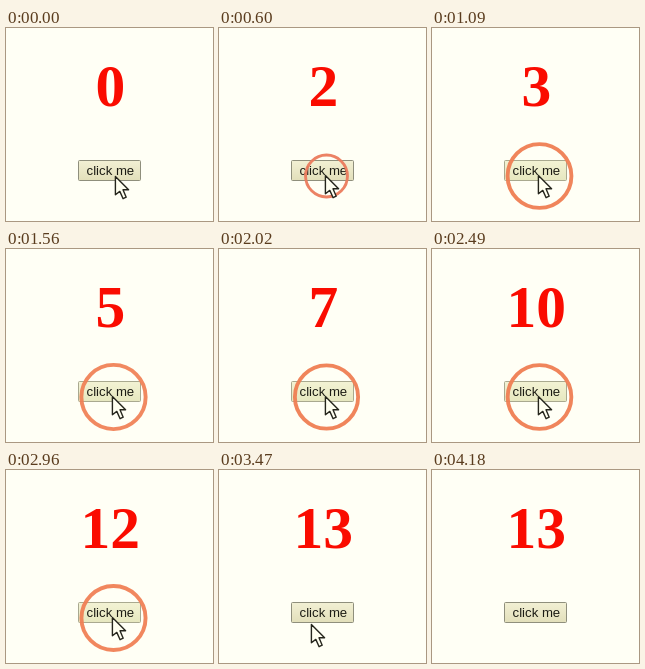
Animation of 207x193 px, one loop 4.66 s. Source, as an HTML page:

```html
<!DOCTYPE html>
<html lang="en">
<head>
<meta charset="utf-8">
<title>Click counter</title>
<style>
  html, body { margin: 0; width: 100%; height: 100%; overflow: hidden; background: #fffff5; }
  svg { display: block; width: 100vw; height: 100vh; }
  #count { font: bold 59.5px "Liberation Serif", serif; fill: #fa0c00; text-anchor: middle; }
  #label { font: 13.2px "Liberation Sans", sans-serif; fill: #1c1c14; text-anchor: middle; }
</style>
</head>
<body>
<svg viewBox="0 0 207 193">
  <defs>
    <linearGradient id="face" x2="0" y2="1">
      <stop offset="0" stop-color="#f2f0d4"/>
      <stop offset="1" stop-color="#e2dfba"/>
    </linearGradient>
    <linearGradient id="lit" x2="0" y2="1">
      <stop offset="0" stop-color="#f3f3d4"/>
      <stop offset="1" stop-color="#e6e7bf"/>
    </linearGradient>
  </defs>
  <rect width="207" height="193" fill="#fffff5"/>
  <text id="count" x="104.3" y="77.7">0</text>
  <rect id="button" x="72.5" y="132.5" width="62" height="20" rx="1"/>
  <text id="label" x="104.4" y="147">click me</text>
  <circle id="ring" cx="107.5" cy="148" fill="none"/>
  <path id="cursor" d="M0 0V18.4L4.4 15L7.7 22.3L10.8 20.8L7.6 13.4H13.2Z"
        fill="#fffff0" stroke="#25251c" stroke-width="1.4" stroke-linejoin="round"/>
</svg>
<script>
const LOOP = 4660;
const RING_LIFE = 245;

// Moment at which the counter reaches 1, 2, 3, ...
const clicks = [380, 575, 920, 1153, 1387, 1620, 1853, 2087, 2210, 2320, 2555, 2790, 3035];

// Ripple starts: two single ones, then a steady run
const ripples = [380, 575];
for (let i = 0; i < 9; i++) ripples.push(920 + i * 233.5);

// Pointer position from each time on: [time, x, y]
const pointer = [
  [0, 109, 148],
  [220, 106, 147],
  [3440, 92, 154],
  [3500, 66, 168],
  [3550, 40, 184],
  [3610, -40, 230]
];

const $ = id => document.getElementById(id);
const count = $("count"), button = $("button"), ring = $("ring"), cursor = $("cursor");
const set = (el, attrs) => {
  for (const key in attrs) el.setAttribute(key, attrs[key]);
};
const clamp = v => Math.min(1, Math.max(0, v));
const mix = (a, b, p) => a + (b - a) * p;

function drawRing(t) {
  const start = ripples.filter(s => s <= t).pop();
  const p = start === undefined ? 1 : (t - start) / RING_LIFE;
  if (p >= 1) {
    set(ring, { opacity: 0 });
    return;
  }
  set(ring, {
    r: mix(19, 37.5, p),
    "stroke-width": mix(2.7, 4.4, p),
    stroke: `rgb(${mix(234, 243, p)},${mix(124, 128, p)},${mix(94, 80, p)})`,
    opacity: mix(0.95, 0.1, clamp((p - 0.7) / 0.3))
  });
}

function draw(t) {
  count.textContent = clicks.filter(c => c <= t).length;

  // The button stays lit during the steady run of clicks
  const lit = t >= 920 && t < 3090;
  set(button, {
    fill: lit ? "url(#lit)" : "url(#face)",
    stroke: lit ? "#a9a98f" : "#8f8f7c"
  });

  drawRing(t);

  const [, x, y] = pointer.filter(s => s[0] <= t).pop();
  set(cursor, { transform: `translate(${x + 0.4} ${y + 0.4})` });
}

const begin = performance.now();
function tick() {
  draw((performance.now() - begin) % LOOP);
  requestAnimationFrame(tick);
}
tick();
</script>
</body>
</html>
```
